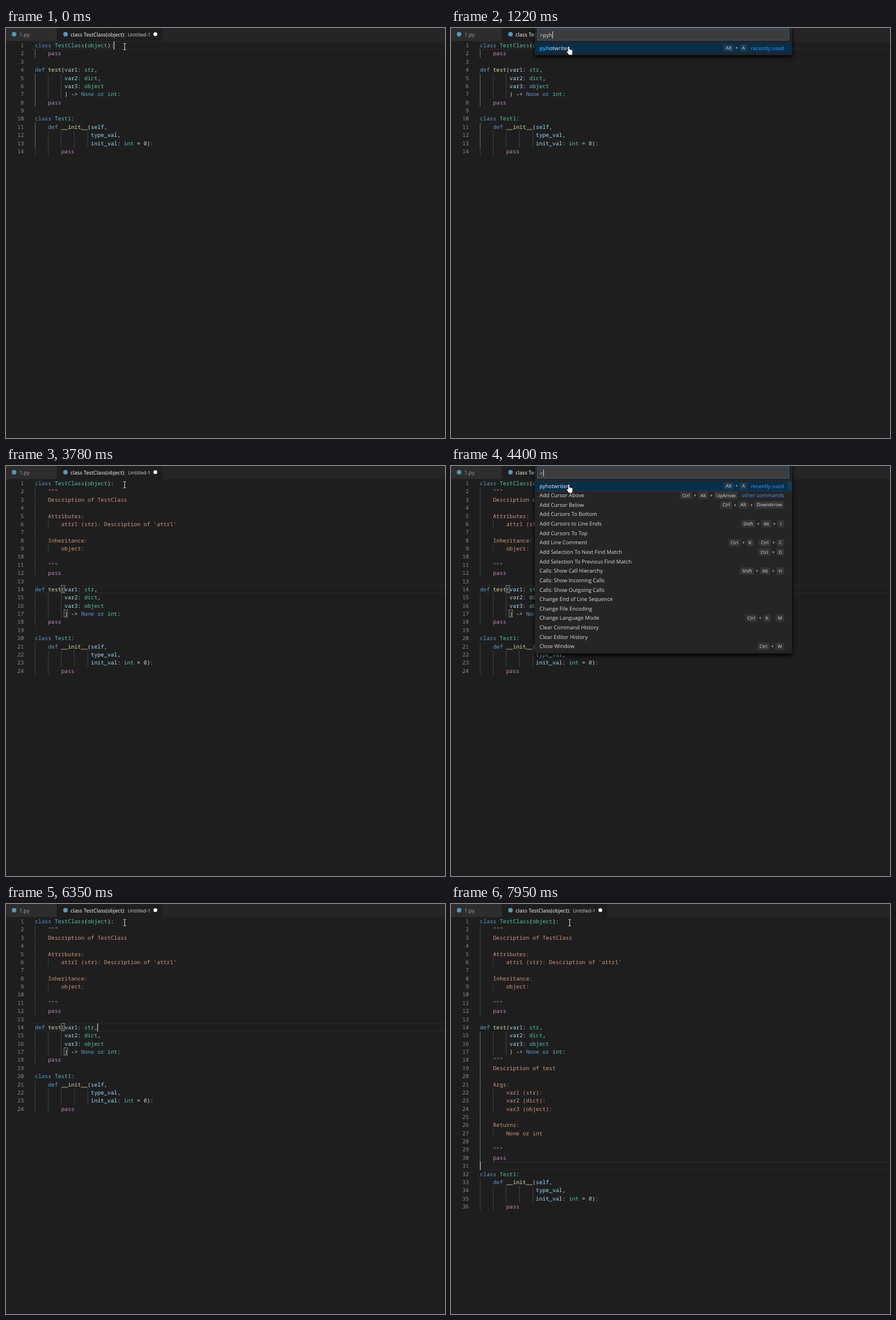
These frames come from a looping animation (775 px wide and 723 px high, 8 s). An HTML page with a canvas:

```html
<!DOCTYPE html>
<html lang="en">
<head>
<meta charset="utf-8">
<title>Docstring generator demo</title>
<style>
  html, body { margin: 0; width: 100%; height: 100%; overflow: hidden; background: #1e1e1e; }
  canvas { display: block; }
</style>
</head>
<body>
<canvas width="775" height="723"></canvas>
<script>
const ctx = document.querySelector('canvas').getContext('2d');
ctx.textRendering = 'geometricPrecision';

const LOOP = 8000;
const LEFT = 51, TOP = 23.5, CHAR = 5.815, LINE = 14.37;
const ROW = 16.63, ROWS = 18;
const CODE_FONT = '9.69px "Noto Sans Mono", "DejaVu Sans Mono", monospace';
const ui = (size = 9.4, weight = 400) => `${weight} ${size}px "Open Sans", "Noto Sans", sans-serif`;

// Source code shown in the editor
const split = s => s.split('\n');
const HEAD = ['class TestClass(object):'];
const CLASS_DOC = split(`    """
    Description of TestClass

    Attributes:
        attr1 (str): Description of 'attr1'

    Inheritance:
        object:

    """`);
const FUNC = split(`    pass

def test(var1: str,
         var2: dict,
         var3: object
         ) -> None or int:`);
const FUNC_DOC = split(`    """
    Description of test

    Args:
        var1 (str):
        var2 (dict):
        var3 (object):

    Returns:
        None or int

    """`);
const TAIL = split(`    pass

class Test1:
    def __init__(self,
                 type_val,
                 init_val: int = 0):
        pass`);

const COLORS = {};
const paint = (color, words) => words.split(' ').forEach(w => COLORS[w] = color);
paint('#569cd6', 'class def None or');
paint('#c586c0', 'pass');
paint('#4ec9b0', 'TestClass Test1 object str dict int');
paint('#9cdcfe', 'var1 var2 var3 self type_val init_val');
paint('#dcdcaa', 'test __init__');
paint('#b5cea8', '0');

// Command palette entries: name, then shortcut chords
const COMMANDS = split(`pyhotwriter|Alt+A
Add Cursor Above|Ctrl+Alt+UpArrow
Add Cursor Below|Ctrl+Alt+DownArrow
Add Cursors To Bottom
Add Cursors to Line Ends|Shift+Alt+I
Add Cursors To Top
Add Line Comment|Ctrl+K Ctrl+C
Add Selection To Next Find Match|Ctrl+D
Add Selection To Previous Find Match
Calls: Show Call Hierarchy|Shift+Alt+H
Calls: Show Incoming Calls
Calls: Show Outgoing Calls
Change End of Line Sequence
Change File Encoding
Change Language Mode|Ctrl+K M
Clear Command History
Clear Editor History
Close Window|Ctrl+W
Copy Line Down|Shift+Alt+DownArrow
Copy Line Up|Shift+Alt+UpArrow
Debug: Copy Value
File: Copy Path of Active File|Shift+Alt+C
File: Copy Relative Path of Active File
Output: Copy All
Problems: Copy Message
Search: Copy All
Search: Copy Path
Terminal: Copy Selection
File: Open File...|Ctrl+O
File: Open Folder...
Go to Previous Problem|Shift+F8
Paste|Ctrl+V
Peek Definition|Alt+F12`).map(s => s.split('|'));

// Timelines: [start, value]
// A negative caret line means the caret is blinked off on that line.
const CARET = [[0, 1], [380, -1], [1620, 1], [2080, -1], [2140, 2], [2690, -2],
  [2770, 5], [2850, 7], [2930, 10], [3010, 13], [3240, 14], [3780, -14],
  [6350, 14], [6890, -14], [7350, 14], [7425, 18], [7500, 20], [7575, 22],
  [7650, 25], [7725, 28], [7800, 30], [7950, 31]];
const QUERY = [[0, null], [610, ''], [840, 'p'], [1070, 'py'], [1220, 'pyh'], [1620, null],
  [4240, ''], [4700, 'p'], [4780, 'py'], [4930, 'pyh'], [5160, 'pyho'], [6350, null]];

const at = (track, t) => track.findLast(([start]) => start <= t)[1];
const within = (t, a, b) => t >= a && t < b;

function rect(x, y, w, h, color) {
  ctx.fillStyle = color;
  ctx.fillRect(x, y, w, h);
}

function dot(x, y, r, color) {
  ctx.fillStyle = color;
  ctx.beginPath();
  ctx.arc(x, y, r, 0, 7);
  ctx.fill();
}

function text(s, x, y, color, font = ui(), align = 'left') {
  ctx.font = font;
  ctx.textAlign = align;
  ctx.fillStyle = color;
  ctx.fillText(s, x, y);
  return ctx.measureText(s).width;
}

function drawTabs() {
  rect(0, 0, 775, 23, '#252526');
  rect(0, 0, 89, 23, '#2d2d2d');
  rect(90, 0, 186, 23, '#1e1e1e');
  dot(14.3, 11, 4, '#519aba');
  dot(105, 11, 4, '#519aba');
  text('1.py', 23.5, 14.5, '#a89c8c');
  text('class TestClass(object):', 114, 14.5, '#fff', ui(9.2));
  text('Untitled-1', 215, 14.5, '#d4d4d4', ui(8.7));
  dot(263.6, 10.8, 3.4, '#fff');
}

const depth = s => s ? Math.ceil(s.search(/\S/) / 4) : 0;

function drawCode(lines, current) {
  const block = current < 14 ? [1, 13] : current > 14 ? [14, 31] : [0, 0];
  let inDoc = false;
  lines.forEach((line, i) => {
    const top = TOP + i * LINE, base = top + 10.6;
    text(i + 1, 31.5, base, '#8c8c8c', CODE_FONT, 'right');

    const guides = line ? depth(line) : Math.min(depth(lines[i - 1]), depth(lines[i + 1]));
    for (let g = 0; g < guides; g++) {
      const active = g === 0 && i >= block[0] && i < block[1];
      rect(Math.floor(LEFT + g * 4 * CHAR), top, 1, LINE, active ? '#707070' : '#404040');
    }

    const quote = line.includes('"""');
    for (const m of line.matchAll(/\w+|[^\w\s]/g)) {
      const color = quote || inDoc ? '#d6957a' : COLORS[m[0]] || '#dcdcdc';
      [...m[0]].forEach((ch, j) => text(ch, LEFT + (m.index + j) * CHAR, base, color, CODE_FONT));
    }
    if (quote) inDoc = !inDoc;
  });
}

function drawBracket(line, col) {
  const x = Math.round(LEFT + col * CHAR) - 0.5, y = Math.round(TOP + (line - 1) * LINE) + 0.5;
  rect(x, y, 6, 13, 'rgba(0,100,0,.1)');
  ctx.strokeStyle = '#888';
  ctx.lineWidth = 0.9;
  ctx.strokeRect(x, y, 6, 13);
}

// Draws shortcut keys from right to left
function drawKeys(chords, right, mid) {
  chords.split(' ').reverse().forEach(chord => {
    chord.split('+').reverse().forEach((key, i) => {
      if (i) {
        text('+', right - 5.5, mid + 3.2, '#ddd', ui(8.6), 'center');
        right -= 11;
      }
      ctx.font = ui(8.1);
      const w = Math.max(11.5, ctx.measureText(key).width + 7.6);
      ctx.beginPath();
      ctx.roundRect(right - w, mid - 6, w, 12.4, 2.3);
      ctx.fillStyle = 'rgba(128,128,128,.17)';
      ctx.fill();
      ctx.strokeStyle = 'rgba(60,60,60,.6)';
      ctx.lineWidth = 0.8;
      ctx.stroke();
      text(key, right - w / 2, mid + 2.9, '#ddd', ui(8.1), 'center');
      right -= w;
    });
    right -= 9;
  });
}

function drawRow([name, keys], i, query) {
  const mid = 35.2 + i * ROW, base = mid + 3.4;
  const color = i ? '#dcdcdc' : '#eee';
  const hit = query ? name.toLowerCase().indexOf(query) : 0;
  const end = hit + query.length;
  let x = 156.3, right = 588;
  x += text(name.slice(0, hit), x, base, color);
  x += text(name.slice(hit, end), x, base, '#1a98f5', ui(9.4, 700));
  text(name.slice(end), x, base, color);

  const label = ['recently used', 'other commands'][i];
  if (label) right -= text(label, right, base, '#3f96fa', ui(), 'right') + 7;
  if (keys) drawKeys(keys, right, mid);
}

function drawPalette(query, caretOn) {
  const rows = COMMANDS.filter(([name]) => name.toLowerCase().includes(query)).slice(0, ROWS);
  ctx.save();
  ctx.shadowColor = '#000';
  ctx.shadowBlur = 7;
  ctx.shadowOffsetY = 3;
  rect(148, -6, 454, 37.2 + rows.length * ROW, '#252526');
  ctx.restore();

  rect(152, 2, 445, 20, '#3c3c3c');
  ctx.strokeStyle = '#2a5f88';
  ctx.lineWidth = 1;
  ctx.strokeRect(152.5, 1.5, 444, 20);
  const w = text('>' + query, 157, 16, '#ddd');
  if (caretOn) rect(Math.round(157.3 + w), 6, 1, 12.5, '#ddd');

  rect(148, 27, 454, ROW, '#062f4a');
  if (rows.length > 1) rect(148, 27 + ROW, 454, 0.7, '#3f3f46');
  if (rows.length === ROWS) rect(594, 27, 8, 15, 'rgba(121,121,121,.15)');
  rows.forEach((row, i) => drawRow(row, i, query));
}

const HAND = new Path2D('M206.4 33.2q1.4-1.8 2.8 0V37.6l4.4 1q1.6.5 1.4 2.2L214.2 47.8h-6L203.9 42q-.6-2 1.1-1.8l1.4 1.3Z');

function drawPointer(hand) {
  if (hand) {
    ctx.fillStyle = '#fff';
    ctx.strokeStyle = '#000';
    ctx.lineWidth = 0.8;
    ctx.fill(HAND);
    ctx.stroke(HAND);
  } else {
    rect(209, 28, 1, 10, '#ddd');
    rect(207, 27, 5, 1, '#bbb');
    rect(207, 38, 5, 1, '#bbb');
  }
}

function draw(t) {
  const caret = at(CARET, t), current = Math.abs(caret);
  const query = at(QUERY, t), open = query !== null;
  const lines = [...HEAD, ...(t >= 1700 ? CLASS_DOC : []), ...FUNC,
    ...(t >= 6410 ? FUNC_DOC : []), ...TAIL];
  const top = TOP + (current - 1) * LINE;

  rect(0, 0, 775, 723, '#1e1e1e');
  drawTabs();
  rect(44, top, 731, 1.3, '#282828');
  rect(44, top + LINE - 1.3, 731, 1.3, '#282828');
  if (within(t, 3320, 6890)) {
    drawBracket(14, 8);
    drawBracket(17, 9);
  }
  drawCode(lines, current);
  if (caret > 0 && !open) {
    const col = Math.min(24, lines[current - 1].length);
    rect(Math.floor(LEFT + col * CHAR), top, 1.3, LINE, '#c8c8c6');
  }
  if (open) drawPalette(query, !within(t, 5710, 6180));
  drawPointer(within(t, 690, 1620) || within(t, 4320, 6350));
}

function tick() {
  draw(performance.now() % LOOP);
  requestAnimationFrame(tick);
}
tick();
</script>
</body>
</html>
```
